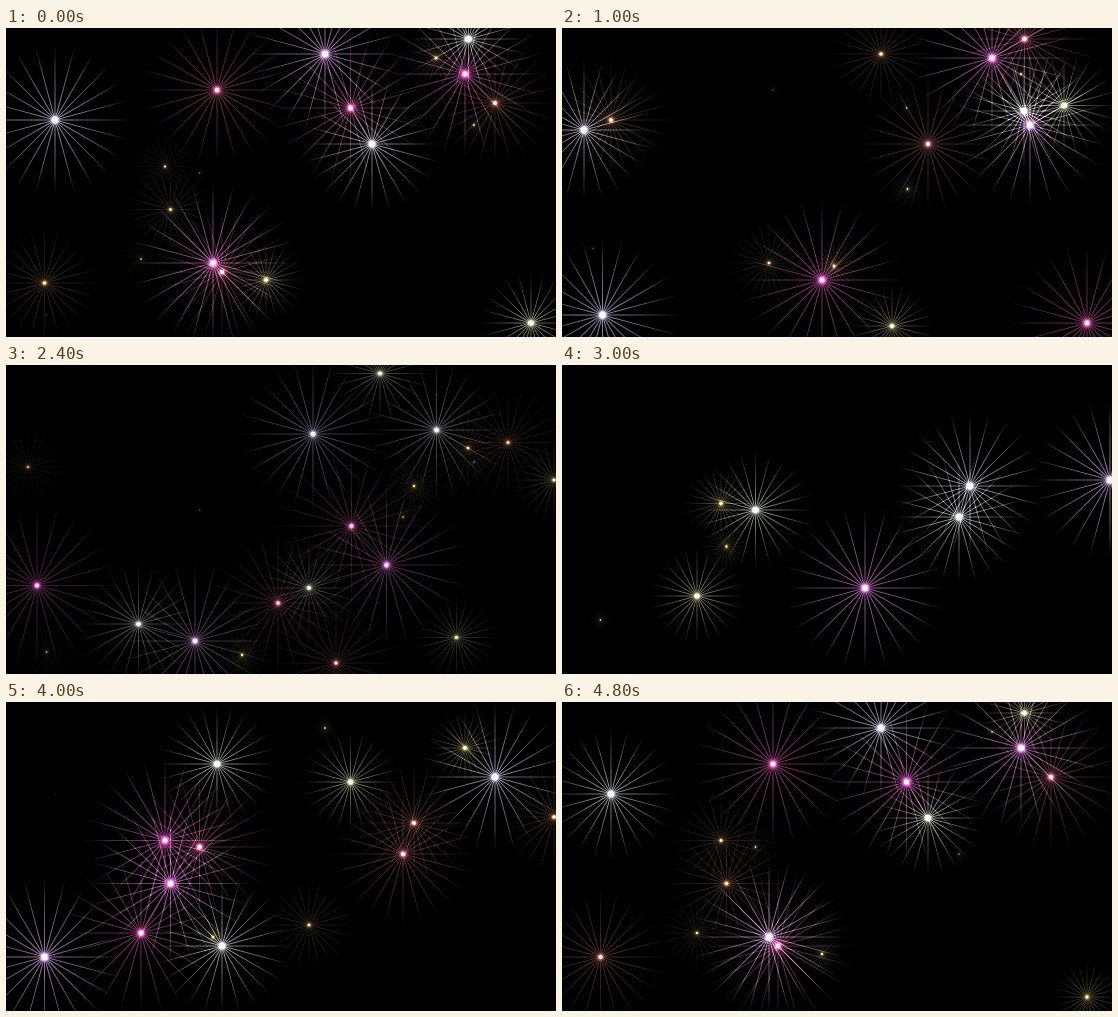
Write an HTML page with a canvas that moves like this. It is 550 px wide and 309 px high and loops after 5000 ms.

```html
<!DOCTYPE html>
<html lang="en">
<head>
<meta charset="utf-8">
<title>Starbursts</title>
<style>
html, body { margin: 0; width: 100%; height: 100%; overflow: hidden; background: #000; }
canvas { display: block; }
</style>
</head>
<body>
<canvas id="stage" width="550" height="309"></canvas>
<script>
const ctx = document.getElementById("stage").getContext("2d");
const LOOP = 5000, STEP = 200;
const LIFE = 2800, RADIUS = 84, RAYS = 24;
const FIRST_BIRTH = 1740, BIRTH_GAP = 140;
const FADE_START = 2000, FADE = 900;

// Where the emitter drops a star, one per BIRTH_GAP
const spots = [
  [303, 223], [548, 115], [408, 121], [397, 152], [193.5, 145], [135, 231],
  [159, 138.5], [164.5, 181.5], [38.5, 255], [489, 75], [216, 244], [211, 62],
  [344.5, 80], [459, 46], [207, 235], [319, 26], [49, 92], [366, 116],
  [462.5, 11], [525, 295], [260, 252], [430, 30], [468, 97], [40.5, 287],
  [22, 102], [462, 83], [502, 77.5], [330, 298], [272, 238], [345.5, 161],
  [31, 220.5], [380.5, 200], [189, 276], [307, 69], [430.5, 65], [132.5, 259],
  [374, 8.5], [450.5, 272.5], [236, 290]
];

// Evenly spaced over a star's life
const palette = ["#50686c", "#a8924e", "#d0e0c8", "#cdc4f0", "#ee58d0",
                 "#dc6088", "#be8050", "#78764e", "#40585c"]
  .map(hex => [1, 3, 5].map(i => parseInt(hex.slice(i, i + 2), 16)));

const clamp = v => Math.max(0, Math.min(1, v));
const mix = (a, b, k) => a.map((v, i) => Math.round(v + (b[i] - v) * k));
const rgba = (c, a) => `rgba(${c.join()},${a})`;

function colorAt(p) {
  const at = clamp(p) * (palette.length - 1);
  const i = Math.min(Math.floor(at), palette.length - 2);
  return mix(palette[i], palette[i + 1], at - i);
}

function radial(r, stops) {
  const g = ctx.createRadialGradient(0, 0, 0, 0, 0, r);
  for (const [at, color] of stops) g.addColorStop(at, color);
  return g;
}

function disc(r, stops) {
  ctx.fillStyle = radial(r, stops);
  ctx.beginPath();
  ctx.arc(0, 0, r, 0, 2 * Math.PI);
  ctx.fill();
}

function drawRays(r, width) {
  for (let i = 0; i < RAYS; i++) {
    ctx.beginPath();
    ctx.moveTo(0, -width);
    ctx.lineTo(r, -.3);
    ctx.lineTo(r, .3);
    ctx.lineTo(0, width);
    ctx.fill();
    ctx.rotate(2 * Math.PI / RAYS);
  }
}

function drawStar(x, y, p, alpha) {
  const size = Math.sin(Math.PI * p);
  const r = RADIUS * size;
  if (r < 1) return;
  const inner = colorAt(p), outer = colorAt(p - .09);
  const glow = clamp(p / .2) * (1 - clamp((p - .42) * 1.6));

  ctx.save();
  ctx.translate(x, y);
  ctx.globalAlpha = alpha * glow;
  ctx.fillStyle = radial(r, [
    [0, rgba(inner, .75)], [.3, rgba(inner, .62)],
    [.65, rgba(outer, .45)], [1, rgba(outer, 0)]
  ]);
  drawRays(r, .25 + .3 * size);

  ctx.globalAlpha = alpha * Math.sqrt(glow);
  disc(1 + 5 * size, [[0, rgba(inner, .7)], [.4, rgba(inner, .35)], [1, rgba(inner, 0)]]);
  const hot = mix(inner, [255, 255, 255], .6 * size);
  disc(.6 + 2.5 * size, [[0, rgba(hot, 1)], [.5, rgba(hot, .8)], [1, rgba(hot, 0)]]);
  ctx.restore();
}

// One run of the emitter; it fades in, then out a loop later
function drawRun(t) {
  const alpha = clamp((t - FADE_START) / FADE) * (1 - clamp((t - LOOP - FADE_START) / FADE));
  spots.forEach(([x, y], i) => {
    const p = (t - FIRST_BIRTH - i * BIRTH_GAP) / LIFE;
    if (p > 0 && p < 1) drawStar(x, y, p, alpha);
  });
}

function draw(t) {
  ctx.globalCompositeOperation = "source-over";
  ctx.fillStyle = "#000";
  ctx.fillRect(0, 0, 550, 309);
  ctx.globalCompositeOperation = "lighter";
  drawRun(t);
  drawRun(t + LOOP);
}

const start = performance.now();
function frame() {
  const t = (performance.now() - start) % LOOP;
  draw(Math.floor(t / STEP) * STEP);
  requestAnimationFrame(frame);
}
frame();
</script>
</body>
</html>
```
